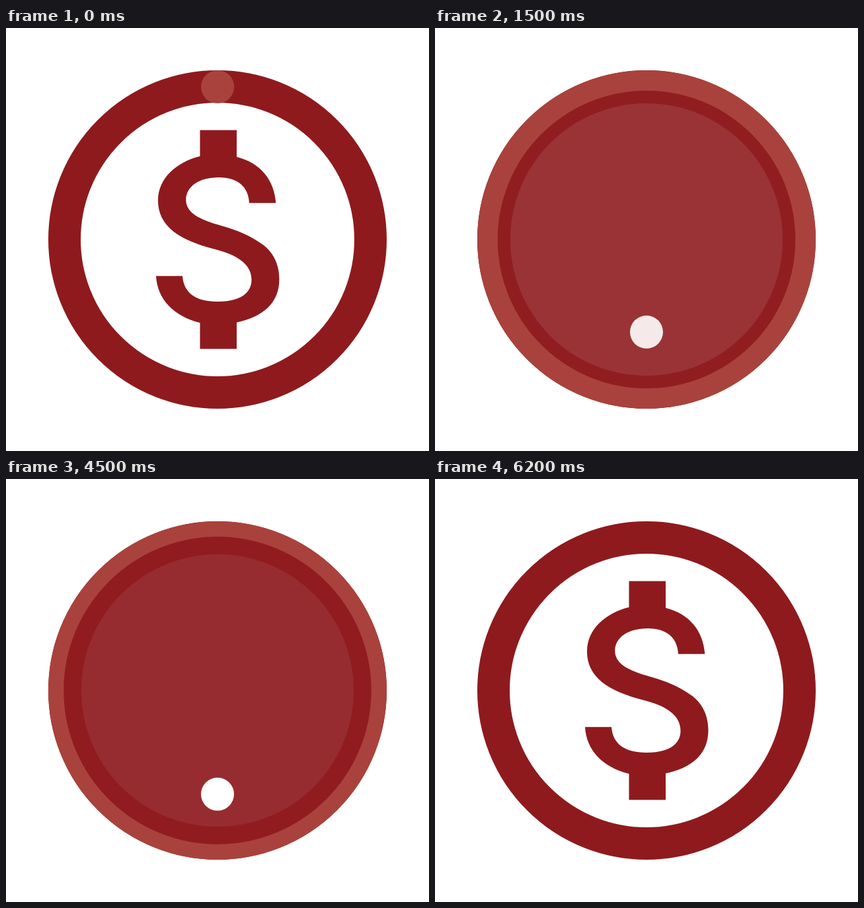
Recreate the animation shown at these times as an HTML page with a canvas. Size 640 by 640 pixels, loop 7.2 s.

```html
<!DOCTYPE html>
<html lang="en">
<head>
<meta charset="utf-8">
<title>Coin and alert</title>
<style>
  html, body { margin: 0; width: 100%; height: 100%; overflow: hidden; background: #fff; }
  canvas { display: block; width: 640px; height: 640px; }
</style>
</head>
<body>
<canvas id="stage" width="640" height="640"></canvas>
<script>
const ctx = document.getElementById('stage').getContext('2d');
const LOOP = 7200, STEP = 100, CENTER = 320, TURN = Math.PI * 2;
const DARK = '#8e1a1e', LIGHT = [169, 66, 60], LIGHT_CSS = `rgb(${LIGHT})`;
const DOT_TOP = 89, DOT_REST = 460, DOT_RADIUS = 25;
const BAR_BOTTOM = 399, BAR_HEIGHT = 244.5;

const dollar = new Path2D(`M293.5 154.5H349V195C385 204 406 230 408.3 264.8H368
  C367 240 350 226 322 226C292 226 272.3 240 272.3 260
  C272.3 279 291 289.5 327 299.5C350 306 369 314 386 326
  C404 338 413.5 357 413.5 380C413.5 417 388 437 349 445.5
  V485.5H293.5V446C253 436 229 410 227 375.3H267
  C269 401 287 414 320 414C360 414 371.5 397 371.5 381
  C371.5 361 356 345 317 335C262 321 230 300 230 261
  C230 227 258 203 293.5 194Z`);

const linear = p => p;
const quadIn = p => p * p;
const quadOut = p => 1 - quadIn(1 - p);
const quadInOut = p => p < 0.5 ? 2 * p * p : 1 - 2 * (1 - p) ** 2;
const backIn = p => p * p * (2.70158 * p - 1.70158);
const backOut = p => 1 - backIn(1 - p);

// Eased progress of t through the span from start to end.
function tween(t, start, end, ease = linear) {
  return ease(Math.min(1, Math.max(0, (t - start) / (end - start))));
}

// Rises from 0 to 1 over the first span and falls back over the second.
function inAndOut(t, [inStart, inEnd, easeIn], [outStart, outEnd, easeOut]) {
  return tween(t, inStart, inEnd, easeIn) - tween(t, outStart, outEnd, easeOut);
}

function circle(x, y, radius, fill) {
  ctx.beginPath();
  ctx.arc(x, y, radius, 0, TURN);
  ctx.fillStyle = fill;
  ctx.fill();
}

function ring(radius, width, color, amount = 1) {
  ctx.beginPath();
  ctx.arc(CENTER, CENTER, radius, -TURN / 4, -TURN / 4 + Math.max(0.001, amount * TURN));
  ctx.lineWidth = width;
  ctx.lineCap = 'round';
  ctx.strokeStyle = color;
  ctx.stroke();
}

// Scales and fades a drawing about the centre of the stage.
function grow(amount, paint) {
  if (amount <= 0) return;
  ctx.save();
  ctx.globalAlpha = amount;
  ctx.translate(CENTER, CENTER);
  ctx.scale(amount, amount);
  ctx.translate(-CENTER, -CENTER);
  paint();
  ctx.restore();
}

function draw(t) {
  const arc = inAndOut(t, [120, 700, quadInOut], [5433, 6033, quadIn]);
  const coin = 1 - inAndOut(t, [120, 420, quadOut], [5900, 6200, quadOut]);
  const drop = inAndOut(t, [800, 1300, backOut], [4036, 4836, backIn]);
  const disc = inAndOut(t, [1300, 1600, quadOut], [4482, 4702, linear]);
  const whiten = inAndOut(t, [1300, 1600, quadOut], [4500, 4700, linear]);
  const bar = inAndOut(t, [1508, 1808, backOut], [3910, 4210, backIn]);

  ctx.fillStyle = '#fff';
  ctx.fillRect(0, 0, 640, 640);

  ring(231.5, 49, DARK);
  grow(coin, () => {
    ctx.fillStyle = DARK;
    ctx.fill(dollar);
  });
  if (t < 6033) ring(231, 50, LIGHT_CSS, arc);
  grow(disc, () => circle(CENTER, CENTER, 253.5, DARK));

  if (bar > 0) {
    const height = BAR_HEIGHT * bar;
    ctx.fillStyle = '#fff';
    ctx.fillRect(CENTER - DOT_RADIUS, BAR_BOTTOM - height, DOT_RADIUS * 2, height);
  }
  if (t >= 800 && t < 4900) {
    const color = LIGHT.map(c => Math.round(c + (255 - c) * whiten));
    circle(CENTER, DOT_TOP + (DOT_REST - DOT_TOP) * drop, DOT_RADIUS, `rgb(${color})`);
  }
}

const begin = performance.now();
function frame() {
  const t = (performance.now() - begin) % LOOP;
  draw(Math.floor(t / STEP) * STEP);
  requestAnimationFrame(frame);
}
frame();
</script>
</body>
</html>
```
